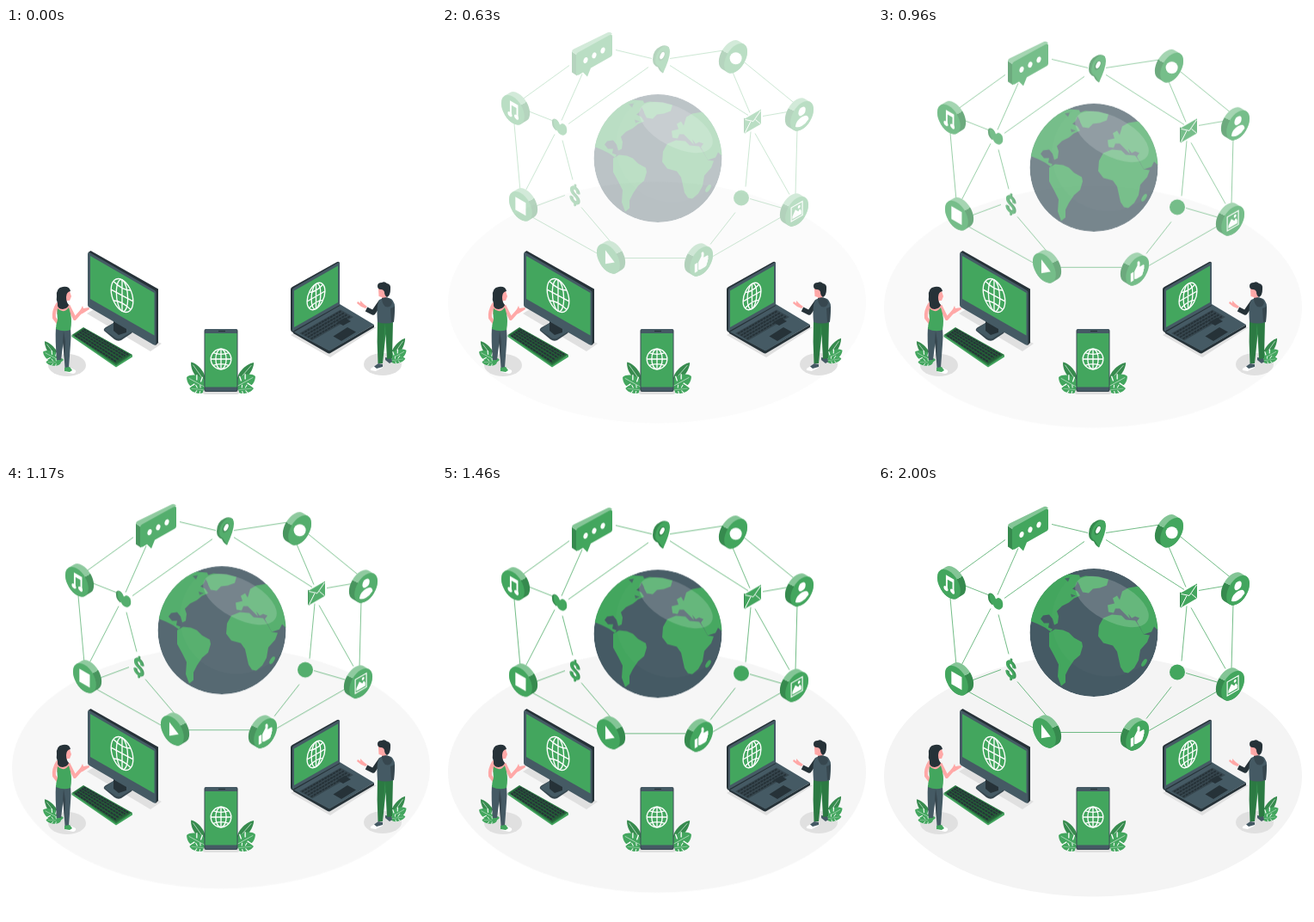
Recreate the animation shown at these times as an HTML page. Size 500 px wide and 500 px high, loop 2040 ms.

```html
<!DOCTYPE html>
<html lang="en">
<head>
<meta charset="utf-8">
<title>Connected world</title>
<style>
html, body { margin: 0; width: 100%; height: 100%; overflow: hidden; background: #fff; }
svg { display: block; width: 100%; height: 100%; }

/* colours */
.green { fill: #43a65e; }
.leaf { fill: #378b4e; }
.moss { fill: #2c7a43; }
.pine { fill: #245f37; }
.slate { fill: #455a64; }
.steel { fill: #37474f; }
.ink { fill: #263238; }
.skin { fill: #ffa8a7; }
.white { fill: #fff; }
.shade { fill: #e0e0e0; }
.links { fill: none; stroke: #43a65e; stroke-width: .75; }
.grid { fill: none; stroke: #fff; stroke-width: 1.35; }
.grid * { vector-effect: non-scaling-stroke; }
.limb { fill: none; stroke: #ffa8a7; stroke-width: 4; stroke-linecap: round; stroke-linejoin: round; }
.keys { fill: none; stroke: #263238; stroke-width: 2; stroke-dasharray: 3 .8; }

/* isometric planes */
.left { transform: matrix(.866, .5, 0, 1, 0, 0); }
.right { transform: matrix(.866, -.5, 0, 1, 0, 0); }

/* entrance, then a short rest before the loop restarts */
.net { animation: drop 2.04s infinite cubic-bezier(.36, -.01, .5, 1.38); }
.floor { fill: #f4f4f4; animation: settle 2.04s infinite linear; }
@keyframes drop {
  0% { opacity: 0; transform: translateY(-30.5px); }
  96%, 100% { opacity: 1; transform: translateY(-.5px); }
}
@keyframes settle {
  0% { opacity: 0; transform: translateY(-28px); }
  86%, 100% { opacity: 1; transform: translateY(0); }
}
</style>
</head>
<body>
<svg viewBox="0 0 500 500">
<defs>
  <linearGradient id="rim" gradientUnits="userSpaceOnUse" x1="-10" y1="-10" x2="10" y2="10">
    <stop offset=".5" stop-color="#84c596"/>
    <stop offset=".5" stop-color="#368a4e"/>
  </linearGradient>
  <g id="coin">
    <g class="left">
      <path d="M0 0L7.3-7.4" stroke="url(#rim)" stroke-width="31" stroke-linecap="round"/>
      <circle class="green" r="15.5"/>
    </g>
  </g>
  <g id="coinR"><use href="#coin" transform="scale(-1 1)"/></g>
  <g id="grid" class="grid">
    <circle r="10"/>
    <ellipse rx="5.2" ry="10"/>
    <path d="M0-10V10M-10 0H10M-7.8-6.2Q0-3.4 7.8-6.2M-7.8 6.2Q0 3.4 7.8 6.2"/>
  </g>
  <g id="leaf">
    <path d="M0 0C-5-1-9-6-8-12C-7-19-4-23 0-25C4-23 7-19 8-12C9-6 5-1 0 0Z"/>
    <path d="M-9-9L-3-8M-8-16L-2.500-13M9-9L3-8M8-16L2.500-13" fill="none" stroke="#fff" stroke-width="1.300"/>
    <path d="M0 0V-22" fill="none" stroke="#c4e2cc" stroke-width=".7"/>
  </g>
  <g id="blade">
    <path d="M0 0C-6-4-6-20 0-27C6-20 6-4 0 0Z"/>
    <path d="M0 0V-23" fill="none" stroke="#c4e2cc" stroke-width=".7"/>
  </g>
  <clipPath id="ball"><circle cx="251" cy="171" r="74.5"/></clipPath>
</defs>

<ellipse class="floor" cx="250" cy="337" rx="243" ry="140.5"/>

<!-- desktop -->
<path class="shade" d="M94 332L104 326L181 367L168 376Z"/>
<path class="steel" d="M114 352Q113 350 116 348L125 343L146 350Q149 352 146 355L134 363Q130 365 126 362Z"/>
<path class="slate" d="M114 351L125 343L146 350Q148 352 145 354L133 361Q130 362 127 360Z"/>
<path class="ink" d="M125 338L140 346V354L131 357L125 352Z"/>
<path class="ink" d="M95.500 261L98.500 259L177 303.500V366L174 369Z"/>
<path class="slate" d="M95 263Q95 260 98 261.500L173 305Q174.500 306 174.500 308V367Q174 370 171 368L97 325Q95 324 95 322Z"/>
<path class="green" d="M98 265L172.500 308V357.500L98 315Z"/>
<use href="#grid" transform="matrix(1.28 .68 0 1.82 135 311)"/>

<!-- keyboard -->
<path class="green" d="M76.500 357L128 391L147 380V382.500L128 394.500L76.500 359Z"/>
<path class="moss" d="M76.500 357L90 348L147 380L128 392.500Z"/>
<path class="pine" d="M79 357L90 349.500L144.500 380L128 390.500Z"/>
<path class="keys" d="M80.500 357.500L128 388M83 355.500L131.500 385.800M85.500 353.500L135 383.500M88 351.800L138.500 381.500M90.500 350.300L142 379.900"/>

<!-- laptop -->
<path class="shade" d="M331 357L346 349L431 348L377 383Z"/>
<path class="ink" d="M334 352L376 375L428 345V348L378 377.500Q376 379 374 378L334 355Z"/>
<path class="slate" d="M334 353L388 321L428 345L376 375.500Z"/>
<path class="steel" d="M341 355L389 327.500L404 336L356 363.500Z"/>
<path class="keys" d="M344 355.500L390 329M347.500 357.500L393.500 331M351 359.500L397 333M354.500 361.500L400.500 335"/>
<path class="ink" d="M385 342L394 337L401 341L392 346ZM380.500 358.500L397 348L407 353.500L390 364Z"/>
<path class="ink" d="M331 304Q331 302 333 301L385 272Q388 271 388 274V323L334 354Q331 353 331 350Z"/>
<path class="slate" d="M333 305Q333 303 335 302L386 273Q388 272 388 274V322L333 353Z"/>
<path class="green" d="M335 305.500L386 276.500V319L335 348Z"/>
<use href="#grid" transform="matrix(1.04 -.6 0 1.45 360.500 312)"/>

<!-- phone and its plants -->
<g class="leaf">
  <use href="#blade" transform="translate(231 411) rotate(-35) scale(1.1 1.02)"/>
  <use href="#blade" transform="translate(269 411) rotate(41) scale(1.1 1.08)"/>
</g>
<g class="green">
  <use href="#leaf" transform="translate(232 418) rotate(-61)"/>
  <use href="#leaf" transform="translate(232 421) rotate(-84) scale(.6 .75)"/>
  <use href="#leaf" transform="translate(268 417) rotate(61)"/>
  <use href="#leaf" transform="translate(268 421) rotate(84) scale(.6 .8)"/>
</g>
<rect class="shade" x="229" y="421" width="42" height="5" rx="2"/>
<rect class="steel" x="230.500" y="350" width="39" height="73" rx="2"/>
<rect class="slate" x="231.500" y="350" width="37" height="72" rx="2"/>
<rect class="green" x="231.500" y="355" width="37" height="62.500"/>
<path d="M247 352.500H255" stroke="#263238" stroke-width="1.200"/>
<use href="#grid" transform="translate(250 385) scale(1.18)"/>

<!-- woman -->
<ellipse class="shade" cx="71" cy="392" rx="22" ry="13"/>
<use class="leaf" href="#blade" transform="translate(62 387) rotate(-37) scale(1 1.05)"/>
<g class="green">
  <use href="#leaf" transform="translate(63 387) rotate(-62) scale(.75 .9)"/>
  <use href="#leaf" transform="translate(64 389) rotate(-88) scale(.5 .7)"/>
</g>
<path class="green" d="M59 386L65 384L67 386L61 391L58 390Z"/>
<path class="slate" d="M58 348L75 348Q76 359 75 368L73 395H68.500L66.500 366L64 386H59Q57 362 58 348Z"/>
<path class="steel" d="M66 364L67 352L69 365L68.500 390Z"/>
<path class="white" d="M68 397L75 395L81 398Q82 401 78 402L69 400Z"/>
<path class="green" d="M68 395L74 394L77 398L74 400L68 399Z"/>
<path class="limb" d="M60 321Q55 329 56 337L62 345M73 324L80 338L88 329"/>
<path class="skin" d="M86 329L89 323L90 326L96.500 325L97 327L89 332L85 333ZM59 320Q67 317 75 323V333H59Z"/>
<path class="green" d="M60 326Q67 333 73 325L75 332Q77 341 75 351Q67 354 58 350Q58 345 60 339Q59 331 60 326Z"/>
<path class="skin" d="M67 306L74 306L76 312L74 317L71 317V323L66 323Z"/>
<path class="ink" d="M59 312Q58 302 66 301Q74 300 75 306Q70 307 70 313Q70 319 73 322Q72 326 66 327Q59 327 60 320Q58 316 59 312Z"/>

<!-- man -->
<ellipse class="shade" cx="438" cy="391" rx="22" ry="13"/>
<use class="leaf" href="#blade" transform="translate(447 385) rotate(35) scale(1 1.1)"/>
<g class="green">
  <use href="#leaf" transform="translate(446 386) rotate(60) scale(.75 .9)"/>
  <use href="#leaf" transform="translate(447 387) rotate(82) scale(.5 .7)"/>
</g>
<path class="slate" d="M441 383L448 384L449 388L446 390L441 386Z"/>
<path class="white" d="M424 396L432 391L438 392V395L430 399L424 398Z"/>
<path class="slate" d="M428 393.500L433 390L438 391V394L431 396Z"/>
<path class="moss" d="M432 340H450L449 384L443 385L441.500 356L438 390H432.500Q431 365 432 340Z"/>
<path class="green" d="M441 343L441.500 356L439 378L440 350Z" opacity=".4"/>
<path class="skin" d="M418 326L413 324L408 320L409 318L412 320L412 317L416 321L420 324Z"/>
<path class="skin" d="M433 303L441 302L444 310L441 316L437 316L437 313L433.500 312Z"/>
<path d="M436 318L427 331L419 327" fill="none" stroke="#263238" stroke-width="5.500" stroke-linejoin="round"/>
<path class="slate" d="M434 316Q441 312 448 315Q453 319 452 329L451 342Q441 345 432 342Q431 329 432 322Z"/>
<path class="steel" d="M437 314Q446 311 449 319Q448 326 441 324Q437 320 437 314ZM447 326L452 324L451 341L448 342Z"/>
<path class="ink" d="M432 300Q432 296 437 296Q440 294 443 297Q448 298 447 304Q447 311 443 313Q440 311 440 307Q439 304 436 304Q432 304 432 300Z"/>

<g class="net">
  <path class="links" d="M202 45L244 55M148 63L94 102M163 73L139 127M240 65L147 131M265 55L331 45M265 63L356 121M338 71L358 118M350 58L410 107M373 122L402 117M413 137L411 213M364 142L404 213M359 140L353 204M358 218L396 229M341 234L312 271M395 239L315 285M283 287H212M183 283L106 240M196 268L162 228M143 214L108 227M152 196L140 150M128 127L100 116M131 143L97 209M84 131L91 209"/>

  <!-- globe -->
  <g clip-path="url(#ball)">
    <circle class="slate" cx="251" cy="171" r="74.500"/>
    <g class="green">
      <path d="M176 157L182 130L205 105L222 103L234 104L236 110L230 117L226 120L232 123L235 128L228 131L222 136L214 140L208 146L210 152L209 160L205 162L203 155L199 150L192 151L189 155L193 160L199 160L198 165L203 167L201 170L194 165L186 161Z"/>
      <path d="M199 171L206 167L215 168L222 171L228 177L237 182L238 187L235 197L228 203L222 212L218 220L218 229L213 233L209 222L210 208L205 198L199 187Z"/>
      <path d="M231 108L241 105L256 106L268 109L266 116L258 119L250 120L245 125L238 124L234 116Z"/>
      <path d="M268 147L267 139L275 137L273 131L278 128L281 133L284 123L291 119L303 117L315 115L330 140V172L321 164L318 170L309 173L301 158L304 154L299 152L295 154L291 149L293 155L288 150L281 143L276 143L274 148Z"/>
      <path d="M257 163L262 154L272 150L283 151L288 156L299 157L304 164L309 173L316 174L313 182L305 191L303 203L298 212L291 218L286 217L282 211L280 202L278 193L273 186L262 183L256 175Z"/>
      <ellipse cx="309.500" cy="206" rx="2.200" ry="5" transform="rotate(32 309.500 206)"/>
    </g>
    <path class="slate" d="M232 111L229 118L233 124L235 117ZM217 108L223 107L221 112ZM224 126L230 128L225 130Z" opacity=".8"/>
    <circle class="white" cx="268" cy="156" r="66" opacity=".02"/>
    <ellipse class="white" cx="272" cy="135" rx="47" ry="22.500" transform="rotate(28 272 135)" opacity=".17"/>
  </g>

  <!-- speech bubble -->
  <path d="M151 47L157 51V75L151 71Z" fill="#368a4e"/>
  <path d="M151 47Q151 45 153 44L192 25Q195 23 198 26L157 51Z" fill="#84c596"/>
  <path class="green" d="M156 52Q156 49 158 48L195 27.500Q198 26 198 29V50Q198 52 196 53L173 66L169 76L164 71L159 74Q156 75 156 73Z"/>
  <g class="white">
    <ellipse cx="167" cy="57" rx="2.400" ry="3.600" transform="rotate(18 167 57)"/>
    <ellipse cx="177" cy="51.300" rx="2.400" ry="3.600" transform="rotate(18 177 51.300)"/>
    <ellipse cx="187" cy="45.500" rx="2.400" ry="3.600" transform="rotate(18 187 45.500)"/>
  </g>

  <!-- map pin -->
  <path d="M245 56Q245 45 254 41Q260 38 264 42L257 72Q253 70 251 65Q245 63 245 56Z" fill="#368a4e"/>
  <path class="green" d="M248 57Q249 46 257 41Q265 39 265 47Q265 55 257 72Q254 66 252 64Q248 62 248 57Z"/>
  <ellipse cx="255.500" cy="52" rx="3.400" ry="6" transform="rotate(25 255.500 52)" fill="#368a4e"/>
  <ellipse class="white" cx="256" cy="51.500" rx="2.200" ry="4.500" transform="rotate(25 256 51.500)"/>

  <!-- heart -->
  <path d="M128 130Q127 125 131 125Q135 126 136 131L133 139Q128 135 128 130Z" fill="#368a4e"/>
  <path class="green" d="M130 130Q129 125 132 126Q136 128 137 132Q141 128 144.500 134Q147 142 142 144Q137 145 134 139Q130 135 130 130Z"/>

  <!-- envelope -->
  <path d="M351 124L353 125V142L351 141Z" fill="#368a4e"/>
  <path class="green" d="M352 125L371 114V131L352 142Z"/>
  <path d="M352.500 126L362 128L370.500 115.500M352.500 141L359 128M370.500 131L364.500 126" fill="none" stroke="#fff" stroke-width="1"/>

  <!-- dollar -->
  <g transform="translate(154 214)" font-family="Roboto, Arial, sans-serif" font-weight="700" font-size="27" text-anchor="middle">
    <g class="left">
      <text x="1.200" y="8.500" fill="#368a4e">$</text>
      <text class="green" y="9.500">$</text>
    </g>
  </g>

  <circle class="green" cx="348" cy="217" r="9"/>

  <g transform="translate(82.400 114.700)">
    <use href="#coin"/>
    <g class="left white">
      <path d="M-4-9L7-9V6H4.800V-4.500H-1.800V7H-4Z"/>
      <ellipse cx="-4" cy="7" rx="3" ry="2.600"/>
      <ellipse cx="4.800" cy="6" rx="3" ry="2.600"/>
    </g>
  </g>
  <g transform="translate(91.400 226.700)">
    <use href="#coin"/>
    <rect class="left white" x="-7" y="-7.500" width="14" height="15"/>
  </g>
  <g transform="translate(193.400 287.800)">
    <use href="#coin"/>
    <path class="left white" d="M-4-8L8.500 0L-4 8Z"/>
  </g>
  <g transform="translate(301.600 290.800)">
    <use href="#coinR"/>
    <path class="right white" d="M-9-1H-5V9H-9ZM-4-1L0-6V-10Q3-11 3.500-7L3-3H8Q10-2 9 0Q10 2 8.500 3Q9 5 7.500 6Q7.500 9 5 9H-1L-4 8Z"/>
  </g>
  <g transform="translate(341.600 54.700)">
    <use href="#coinR"/>
    <circle class="white" r="7"/>
  </g>
  <g transform="translate(418.600 121.800)">
    <use href="#coinR"/>
    <g class="right white">
      <circle cy="-5.500" r="4.800"/>
      <path d="M-9 8Q-8 1 0 1Q8 1 9 8Q5 11.500 0 11.500Q-5 11.500-9 8Z"/>
    </g>
  </g>
  <g transform="translate(412.600 232.800)">
    <use href="#coinR"/>
    <g class="right">
      <rect x="-7.500" y="-8" width="15" height="16" fill="none" stroke="#fff" stroke-width="1.300"/>
      <path class="white" d="M-6 6V3L-2-3L2 1L4-1L6 2V6Z"/>
      <circle class="white" cx="3" cy="-4" r="1.700"/>
    </g>
  </g>
</g>
</svg>
</body>
</html>
```
